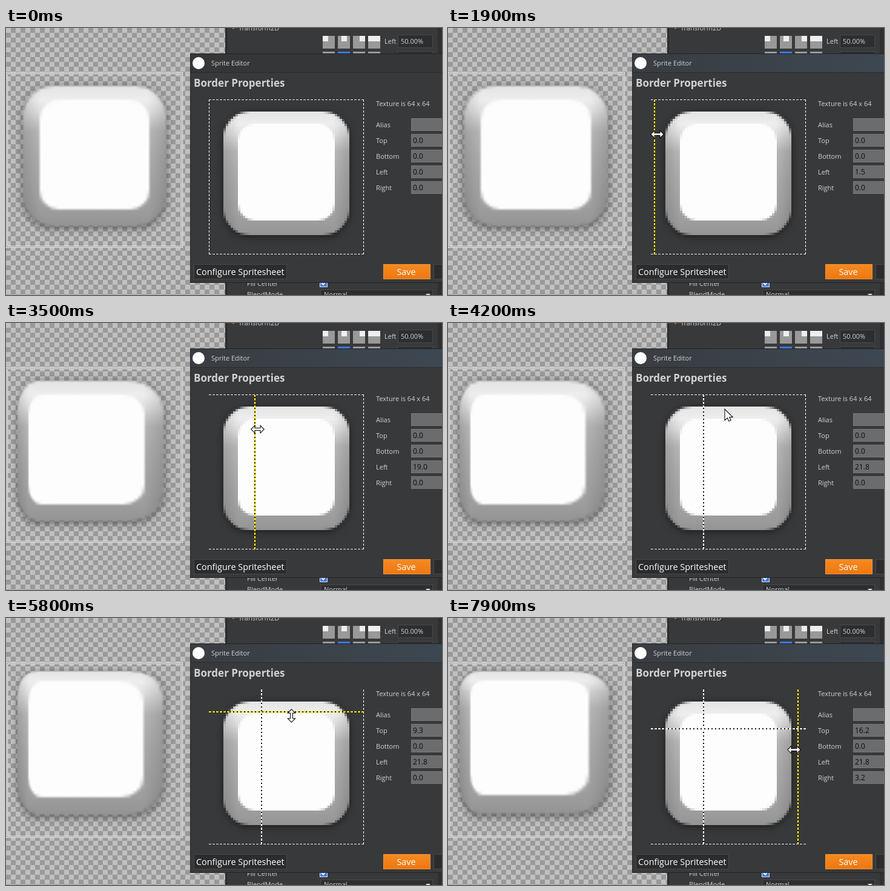
These frames come from a looping animation (720x441 px, 8000 ms). An HTML page with a canvas:

```html
<!DOCTYPE html>
<html>
<head>
<meta charset="utf-8">
<style>
  html, body { margin: 0; width: 100%; height: 100%; overflow: hidden; background: #38393b; }
  canvas { display: block; }
</style>
</head>
<body>
<canvas id="stage" width="720" height="441"></canvas>
<script>
const g = document.getElementById('stage').getContext('2d');
const LOOP = 8000, STEP = 100, TEXELS = 64;
const BORDER_SCALE = 3;
const view = { x: 1, y: 73, size: 290 };
const preview = { x: 335, y: 118, size: 256, zoom: 4 };

// Tracks: [time, value, ...] with straight moves between the keys.
const leftTrack = [[1500, 0], [1900, 1.5], [2500, 7.5], [3500, 19], [3900, 21.8]];
const topTrack = [[4800, 0], [5100, 2.2], [5800, 9.3], [6500, 15.8], [6600, 16.2]];
const rightTrack = [[7400, 0], [7900, 3.2]];
const mouseTrack = [
  [600, 450, 72], [1300, 336, 175], [1500, 336, 175], [1900, 345, 175], [2500, 374, 175],
  [3500, 415, 175], [3900, 423, 174], [4200, 457, 143], [4500, 466, 122], [4800, 466, 122],
  [5100, 467, 137], [6500, 474, 185], [6600, 474, 186], [7200, 591, 217], [7400, 591, 217],
  [7900, 571, 217]
];

function sample(track, t) {
  const next = track.findIndex(key => key[0] > t);
  if (next === 0) return track[0].slice(1);
  if (next < 0) return track[track.length - 1].slice(1);
  const a = track[next - 1], b = track[next];
  const k = (t - a[0]) / (b[0] - a[0]);
  return a.slice(1).map((v, i) => v + (b[i + 1] - v) * k);
}

function hoveredEdge(t) {
  if (t >= 1300 && t < 4000) return 'left';
  if (t >= 4400 && t < 6700) return 'top';
  return t >= 7200 ? 'right' : '';
}

function rect(x, y, w, h, fill, border) {
  g.fillStyle = fill;
  g.fillRect(x, y, w, h);
  if (border) {
    g.strokeStyle = border;
    g.lineWidth = 1;
    g.strokeRect(x + .5, y + .5, w - 1, h - 1);
  }
}

function text(str, x, y, size = 11, color = '#d2d2d2', weight = 400) {
  g.font = `${weight} ${size}px "Open Sans", sans-serif`;
  g.fillStyle = color;
  g.fillText(str, x, y);
}

function polygon(points, fill, outline) {
  g.beginPath();
  points.forEach(([x, y]) => g.lineTo(x, y));
  g.closePath();
  if (outline) {
    g.strokeStyle = outline;
    g.lineWidth = 2;
    g.lineJoin = 'miter';
    g.stroke();
  }
  g.fillStyle = fill;
  g.fill();
}

function gradient(c, x0, y0, x1, y1, stops) {
  const result = c.createLinearGradient(x0, y0, x1, y1);
  stops.forEach(([at, color]) => result.addColorStop(at, color));
  return result;
}

function makeKeycap() {
  const canvas = document.createElement('canvas');
  canvas.width = canvas.height = TEXELS;
  const c = canvas.getContext('2d');
  const rounded = (x, y, w, h, r) => { c.beginPath(); c.roundRect(x, y, w, h, r); };
  rounded(6, 5, 52, 51, 11);
  c.save();
  c.shadowColor = 'rgba(0,0,0,.55)';
  c.shadowBlur = 3;
  c.shadowOffsetY = .6;
  c.fillStyle = gradient(c, 0, 5, 0, 56, [
    [0, '#e4e4e4'], [.1, '#eeeeee'], [.18, '#dedede'], [.32, '#b8b8b8'],
    [.5, '#aeaeae'], [.8, '#a2a2a2'], [.92, '#9b9b9b'], [1, '#949494']
  ]);
  c.fill();
  c.restore();
  c.fillStyle = gradient(c, 6, 0, 58, 0, [
    [0, 'rgba(0,0,0,.13)'], [.12, 'rgba(0,0,0,0)'], [.88, 'rgba(0,0,0,0)'], [1, 'rgba(0,0,0,.13)']
  ]);
  c.fill();
  rounded(12, 10, 40, 40, 7);
  c.fillStyle = '#fdfdfd';
  c.fill();
  return canvas;
}

function makeChecker() {
  const canvas = document.createElement('canvas');
  canvas.width = canvas.height = 16;
  const c = canvas.getContext('2d');
  c.fillStyle = '#c0c0c0';
  c.fillRect(0, 0, 16, 16);
  c.fillStyle = '#999';
  c.fillRect(8, 0, 8, 8);
  c.fillRect(0, 8, 8, 8);
  return g.createPattern(canvas, 'repeat');
}

const keycap = makeKeycap(), checker = makeChecker();

// Keeps the borders at a fixed scale and stretches the middle.
function drawNineSlice({ left, right, top }) {
  const axis = (start, near, far) => ({
    src: [0, near, TEXELS - far, TEXELS],
    dst: [0, near * BORDER_SCALE, view.size - far * BORDER_SCALE, view.size].map(v => Math.round(start + v))
  });
  const h = axis(view.x, left, right), v = axis(view.y, top, 0);
  g.imageSmoothingEnabled = true;
  for (let i = 0; i < 3; i++) {
    for (let j = 0; j < 3; j++) {
      const sw = h.src[i + 1] - h.src[i], sh = v.src[j + 1] - v.src[j];
      const dw = h.dst[i + 1] - h.dst[i], dh = v.dst[j + 1] - v.dst[j];
      if (sw > 0 && sh > 0 && dw > 0 && dh > 0)
        g.drawImage(keycap, h.src[i], v.src[j], sw, sh, h.dst[i], v.dst[j], dw, dh);
    }
  }
}

function drawScene(borders) {
  rect(0, 0, 362, 441, checker);
  drawNineSlice(borders);
  for (const [width, color] of [[3, '#fff'], [1, '#777']]) {
    g.strokeStyle = color;
    g.lineWidth = width;
    g.strokeRect(1.5, 74.5, 289, 287);
  }
}

function drawInspector() {
  rect(362, 0, 358, 441, '#38393b');
  rect(362, 0, 3, 441, '#2a2b2d');
  rect(713, 0, 7, 441, '#2f3032');
  polygon([[372, -2], [379, -2], [375.5, 2]], '#ee7d16');
  text('Transform2D', 384, 4);
  for (let i = 0; i < 4; i++) {
    const x = 523 + i * 25;
    rect(x, 13, 20, 21, '#999');
    rect(x + [0, 6, 11, 0][i], 13, i === 3 ? 20 : 9, 9, '#eee');
    rect(x, 39, 20, 10, i === 1 ? '#3c78e6' : '#999');
  }
  text('Left', 625, 26);
  rect(647, 11, 58, 22, '#2d2e30', '#48494b');
  text('50.00%', 652, 26);
  rect(647, 38, 58, 22, '#2d2e30', '#48494b');
  text('Fill Center', 398, 426);
  rect(518, 414, 13, 14, '#3c78e6', '#dfe6f2');
  g.beginPath();
  g.moveTo(521, 421);
  g.lineTo(524, 424);
  g.lineTo(529, 417);
  g.strokeStyle = '#fff';
  g.lineWidth = 2;
  g.stroke();
  text('BlendMode', 398, 444);
  rect(519, 432, 186, 20, '#2d2e30', '#48494b');
  text('Normal', 525, 444);
  polygon([[693, 439], [701, 439], [697, 443]], '#ddd');
}

function drawGuide(x0, y0, x1, y1, hovered) {
  const path = (color, dash) => {
    g.strokeStyle = color;
    g.setLineDash(dash);
    g.beginPath();
    g.moveTo(x0, y0);
    g.lineTo(x1, y1);
    g.stroke();
  };
  g.lineWidth = 2;
  path('#111', []);
  path(hovered ? '#ffee00' : '#fff', [4, 2]);
  g.setLineDash([]);
}

function drawPreview({ left, right, top }, hover) {
  const { x, y, size, zoom } = preview, end = x + size, bottom = y + size;
  g.save();
  g.beginPath();
  g.rect(x, y, size, size);
  g.clip();
  g.imageSmoothingEnabled = false;
  g.drawImage(keycap, x, y, size, size);
  const vertical = (px, name) => drawGuide(Math.round(px), y, Math.round(px), bottom, hover === name);
  const horizontal = (py, name) => drawGuide(x, Math.round(py), end, Math.round(py), hover === name);
  horizontal(bottom, 'bottom');
  vertical(end - right * zoom, 'right');
  vertical(x + left * zoom, 'left');
  horizontal(y + top * zoom, 'top');
  g.restore();
}

function drawDialog(borders, hover, focused) {
  rect(304, 42, 416, 379, '#38393b');
  rect(304, 42, 416, 32, focused
    ? gradient(g, 304, 0, 720, 0, [[0, '#393d42'], [1, '#3d4751']])
    : '#353638');
  rect(304, 73, 416, 1, '#2a2b2d');
  rect(304, 42, 416, 1, '#222325');
  rect(304, 42, 1, 379, '#222325');
  rect(304, 420, 416, 1, '#222325');
  g.beginPath();
  g.arc(318, 58, 10, 0, Math.PI * 2);
  g.fillStyle = '#fff';
  g.fill();
  text('Sprite Editor', 339, 62);
  text('Border Properties', 310, 97, 17, '#d2d2d2', 700);
  text('Texture is 64 x 64', 611, 129);

  const fields = { Alias: null, Top: borders.top, Bottom: 0, Left: borders.left, Right: borders.right };
  Object.entries(fields).forEach(([name, value], i) => {
    const y = 149 + i * 26;
    text(name, 611, y + 15);
    rect(669, y, 60, 21, '#6b6c6e', '#77787a');
    if (value !== null) text(value.toFixed(1), 672, y + 15, 12, '#0c0c0c');
  });

  rect(310, 390, 154, 25, '#2b2c2e', '#47484a');
  text('Configure Spritesheet', 314, 408, 14.4, '#fff');
  rect(623, 390, 78, 25, gradient(g, 0, 390, 0, 415, [[0, '#f58a22'], [1, '#ee7710']]), '#f79536');
  g.textAlign = 'center';
  text('Save', 661, 408, 14.4, '#fff');
  g.textAlign = 'left';
  rect(706, 390, 60, 25, '#2b2c2e', '#47484a');
  drawPreview(borders, hover);
}

function drawCursor([x, y], hover) {
  g.save();
  g.translate(Math.round(x) + .5, Math.round(y) + .5);
  if (hover) {
    if (hover === 'top') g.rotate(Math.PI / 2);
    polygon([[-10, 0], [-5, -5], [-5, -1.5], [5, -1.5], [5, -5],
             [10, 0], [5, 5], [5, 1.5], [-5, 1.5], [-5, 5]], '#fff', '#000');
  } else {
    polygon([[0, 0], [0, 16], [4, 12.5], [6.5, 18], [9, 17], [6.5, 11.5], [11.5, 11.5]], '#fff', '#000');
  }
  g.restore();
}

function render(time) {
  const t = Math.floor(time % LOOP / STEP) * STEP;
  const borders = {
    left: sample(leftTrack, t)[0],
    top: sample(topTrack, t)[0],
    right: sample(rightTrack, t)[0]
  };
  const hover = hoveredEdge(t);
  drawScene(borders);
  drawInspector();
  drawDialog(borders, hover, t >= 1600);
  if (t >= 600) drawCursor(sample(mouseTrack, t), hover);
}

const start = performance.now();
function tick() {
  render(performance.now() - start);
  requestAnimationFrame(tick);
}
tick();
</script>
</body>
</html>
```
